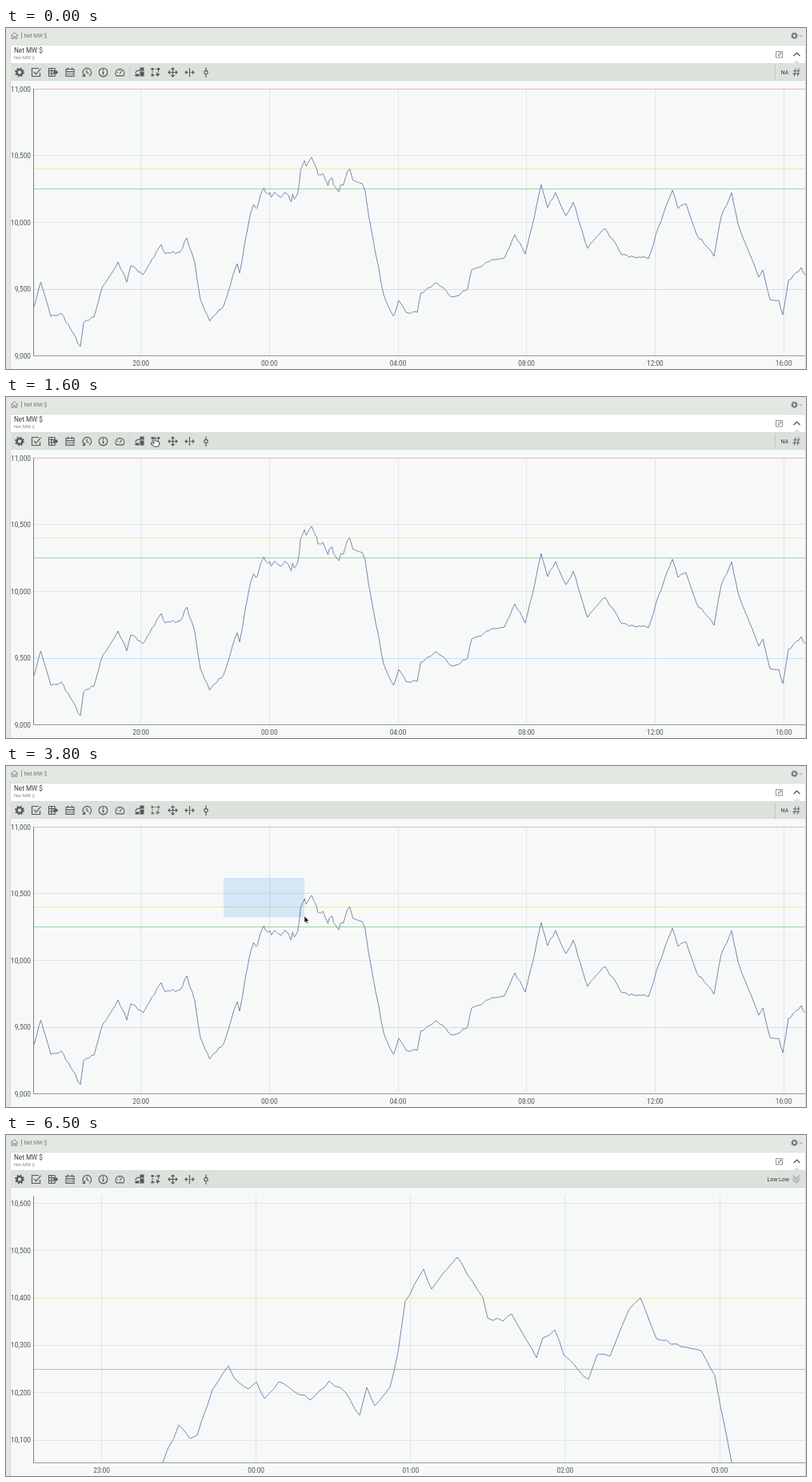
An HTML page that plays this animation: 1000x427 px, repeating every 6800 ms.

```html
<!DOCTYPE html>
<html lang="en">
<head>
<meta charset="utf-8">
<title>Net MW trend</title>
<style>
  html, body { margin: 0; width: 100%; height: 100%; overflow: hidden; background: #e3e8e2; }
  svg { display: block; width: 100vw; height: 100vh; }
  text { font-family: Roboto, Arial, sans-serif; fill: #4c5156; }
  .axis text { font-size: 8.3px; }
  .icon { fill: none; stroke: #535960; stroke-width: 1.15; }
  .icon .f { fill: #535960; stroke: none; }
  .trend { fill: none; stroke: #7787ad; stroke-width: 1; stroke-linejoin: round; }
  .grid { stroke: #e1e5e7; stroke-width: 1; }
  #box { fill: #dcedfd; mix-blend-mode: multiply; }
</style>
</head>
<body>
<svg viewBox="0 0 1000 427" preserveAspectRatio="none">
  <defs>
    <clipPath id="plot"><rect x="34" y="76" width="966" height="335"/></clipPath>
    <g id="gear">
      <circle r="3.4" fill="none" stroke="currentColor" stroke-width="2.4"/>
      <circle r="5" fill="none" stroke="currentColor" stroke-width="1.8" stroke-dasharray="1.96 1.96"/>
    </g>
  </defs>

  <rect width="1000" height="427" fill="#e3e8e2"/>
  <rect x="5.5" y="21.5" width="994" height="23" fill="#fff" stroke="#d9ded9"/>
  <rect x="6" y="45" width="994" height="21" fill="#dce1db"/>
  <rect x="6" y="66" width="994" height="361" fill="#f7f9f9"/>
  <path d="M5.5 66V427M6 65.5H1000M999.5 45V427" fill="none" stroke="#d3d8d3"/>
  <path d="M983 45l5.5-4.5 5.5 4.5z" fill="#dce1db"/>

  <!-- breadcrumb and title -->
  <g class="icon" style="stroke-width:.8">
    <path d="M6 9.8l4.500-4 4.500 4M7.300 9v4.300h2.200v-2.800h2v2.800h2.200V9" stroke="#6b7074"/>
    <path d="M19.500 5.500v8" stroke="#777c80"/>
    <path d="M992 9.200l1.500 1.600 1.500-1.600" stroke="#68717c"/>
  </g>
  <use href="#gear" color="#68758a" transform="translate(985.5 9.7) scale(.72)"/>
  <text x="22.5" y="12" font-size="6.5" style="fill:#73787c">Net MW $</text>
  <text x="10" y="31.3" font-size="8.2" style="fill:#3c4146">Net MW $</text>
  <text x="10" y="39.3" font-size="5.9" style="fill:#85898d">Net MW $</text>
  <g class="icon" style="stroke-width:.9">
    <path d="M962.5 29.500h8v7.500h-8zM965.500 34.500l3-3M966.700 31.200h2v2M965.300 32.800v2h2" stroke="#7b848e"/>
    <path d="M984.500 35l4-3.800 4 3.800" stroke-width="1.200"/>
  </g>

  <!-- toolbar -->
  <g class="icon">
    <use href="#gear" color="#535960" x="17" y="55.500"/>
    <path d="M41 50.500h-8.500v10h10v-4.500M34.800 54.800l2.700 3 6-7"/>
    <path d="M53.500 50.500h7.500v10h-7.500zM53.500 53.500h7.500M53.500 57h7.500M57 50.500v10"/>
    <path class="f" d="M59 54.500h2.800v-2.200l3.500 3.200-3.500 3.200v-2.200h-2.800z"/>
    <path d="M75 51.500h10v9H75zM75 54.500h10M77.500 49.500v3M82.500 49.500v3"/>
    <path d="M76.800 56.600h6.600M76.800 58.700h6.600" stroke-dasharray="1.400 1.200"/>
    <path d="M98 59.800a5.300 5.300 0 1 1 6 .5M95.500 60.300h3v-3M101 52.500v3.300l2.500 1.500"/>
    <circle cx="121.500" cy="55.500" r="5.300"/>
    <path d="M121.500 54.500v4" stroke-width="1.700"/><circle class="f" cx="121.500" cy="52.500" r="1"/>
    <path d="M138 59.800a5.400 5.400 0 1 1 8.800 0zM142 57.500l3-4M138.700 55.500h1.500M142.300 52v1.300"/>
    <path d="M154.500 47.500v17" stroke="#d0d5d0" stroke-width="1"/>
    <path class="f" d="M167.500 49.500h5v4h-5zM167.500 54.500h5v6h-5zM161.500 57.500h5v3h-5z"/>
    <path d="M161.500 56l3-3 2.500.5 2-2.500"/>
    <g id="zoomTool">
      <path d="M183 51.500h7.500v7.500H183z" stroke-dasharray="2 1.200"/>
      <path class="f" d="M181.500 50h2.800v2.800h-2.800zM189.200 50h2.800v2.800h-2.800zM181.500 57.700h2.800v2.800h-2.800zM187.500 55.500l5.500 3-2.500.6-1 2.400z"/>
    </g>
    <path d="M203 55.500h11M208.500 50v11M205 53.500l-2 2 2 2M212 53.500l2 2-2 2M206.500 52l2-2 2 2M206.500 59l2 2 2-2"/>
    <path d="M224 55.500h4M231 55.500h4M229.500 50v11M226 53.500l-2 2 2 2M233 53.500l2 2-2 2"/>
    <path d="M250 49.500v3.500M250 58v4"/><circle cx="250" cy="55.500" r="2.200"/>
  </g>

  <g id="stateFull">
    <path d="M961.500 46v19" stroke="#c3c8c4"/>
    <text x="968.500" y="58.200" font-size="7" style="fill:#33383d">NA</text>
    <path class="icon" d="M986.800 50.500l-1.500 10M991 50.500l-1.500 10M984 53.700h8.500M983.500 57.300h8.500" style="stroke:#68717c"/>
  </g>
  <g id="stateZoom">
    <text x="951.500" y="58" font-size="6.900" style="fill:#33383d">Low Low</text>
    <path class="icon" d="M983.500 50.500l4.300 3.700 4.300-3.700M983.500 53.500l4.300 3.700 4.300-3.700M983.500 56.300l4.300 3.700 4.300-3.700" style="stroke:#7d8ca3;stroke-width:1"/>
  </g>

  <g id="full" class="axis"></g>
  <g id="zoom" class="axis"></g>
  <path d="M34.500 76V411" stroke="#7d8184"/>
  <path d="M34 410.500H999" stroke="#979b9e"/>

  <rect id="box" x="272" y="140"/>
  <path id="arrow" d="M0 0V8.200L1.900 6.500 3.100 9.200 4.400 8.600 3.200 6H5.800Z" fill="#111" stroke="#fff" stroke-width=".5"/>
  <path id="hand" d="M-1 0Q0-1 1 0V4L5 5Q6 5.500 5.600 8L4.500 11H-1.500L-4.500 7Q-4.500 5.500-3 6L-1 7.500Z" fill="#fff" stroke="#33383d" stroke-width=".9"/>
</svg>
<script>
const $ = id => document.getElementById(id);
const LOOP = 6800, STEP = 100;

// Turning points of the trend (x, y); the night is in zoomed coordinates
const evening = [35,349, 43.5,318, 56,361, 69,357, 93,399, 97,369, 110,362, 121,323, 140,293,
  151,318, 156,298, 171,309, 194,271, 199,283, 218,280, 226,263, 236,294, 243,340, 254.5,367,
  272,348, 289,295, 292,307, 302,251];
const night = [196,410, 216,363, 230,380, 239,376, 258,319, 278,289, 285,304, 303,318, 313,309,
  323,330, 341,309, 380,332, 404,308, 425,323, 442,351, 451,316, 461,339, 480,316, 490,272,
  499,208, 522,168, 532,193, 564,153, 596,203, 602,229, 621,233, 632,224, 663,279, 671,254,
  686,244, 697,275, 728,306, 739,275, 755,277, 779,218, 793,204, 813,255, 869,270, 886,301, 907,410];
const day = [456,249, 472,334, 484.5,361, 491,341, 500,356, 514,356, 518.5,332, 538,319, 559,337,
  577,327, 582,303, 610,290, 623,288, 636,259, 649,283, 658,247, 669,196, 677,225, 687,206,
  700,235, 709,218, 727,276, 749,251, 770,284, 803,289, 816,248, 833,203, 840,226, 850,220,
  863,258, 885,286, 894,236, 907,206, 915,245, 941,312, 946,303, 955,340, 966,341, 971,359,
  978,316, 994,300, 999,309];

let seed = 7;
const random = () => (seed = seed * 16807 % 2147483647) / 2147483647;

// Joins turning points with a slightly uneven line
function rough(keys, step, amp) {
  const out = [[keys[0], keys[1]]];
  for (let i = 2; i < keys.length; i += 2) {
    const [x0, y0, x1, y1] = keys.slice(i - 2, i + 2);
    const n = Math.max(1, Math.round((x1 - x0) / step));
    for (let j = 1; j <= n; j++) {
      const wobble = j < n ? (random() * 2 - 1) * amp : 0;
      out.push([x0 + (x1 - x0) * j / n, y0 + (y1 - y0) * j / n + wobble]);
    }
  }
  return out;
}

const nightLine = rough(night, 6.5, 2.5);
const shrink = ([x, y]) => [329.5 + (x - 312.5) * .2082, 159.6 + (y - 144.8) * .2818];
const fullLine = [...rough(evening, 3, 1.8), ...nightLine.map(shrink), ...rough(day, 3, 1.8)];

const crisp = v => Math.floor(v) + .5;
const hour = h => String(h % 24).padStart(2, '0') + ':00';
const limits = [[11000, '#f2b3b5'], [10400, '#f1e6a8'], [10250, '#9ad2a2'], [9500, '#c3e0f5']];

function chart(id, o) {
  const y = v => o.y0 - (v - o.v0) * o.perUnit;
  const row = (v, attr) => `<path ${attr} d="M35 ${crisp(y(v))}H999"/>`;
  let s = '';
  for (let v = o.v0; v <= o.v1; v += o.dv) {
    if (v > 9000) s += row(v, 'class="grid"');
    s += `<text x="31" y="${y(v) + 3}" text-anchor="end">${v.toLocaleString('en-US')}</text>`;
  }
  for (let i = 0; i < o.cols; i++) {
    const x = o.x0 + i * o.dx;
    s += `<path class="grid" d="M${crisp(x)} 76V410"/>
      <text x="${x}" y="423" text-anchor="middle">${hour(o.h0 + i * o.dh)}</text>`;
  }
  for (const [v, c] of limits) if (v >= o.v0 && v <= o.v1) s += row(v, `stroke="${c}"`);
  s += `<polyline class="trend" clip-path="url(#plot)" points="${o.line.join(' ')}"/>`;
  $(id).innerHTML = s;
}

chart('full', { v0: 9000, v1: 11000, dv: 500, y0: 410.5, perUnit: .167,
  x0: 168.6, dx: 160.7, cols: 6, h0: 20, dh: 4, line: fullLine });
chart('zoom', { v0: 10100, v1: 10600, dv: 100, y0: 382.1, perUnit: .5932,
  x0: 119.6, dx: 193.1, cols: 5, h0: 23, dh: 1, line: nightLine });

// Pointer stops: time, x, y
const stops = [
  [300, 262, 410], [500, 214, 180], [700, 197, 95], [1000, 189, 62], [1600, 186, 51],
  [1700, 186, 51], [2300, 271, 138], [2400, 271, 138], [2500, 273, 140.5], [3100, 273, 140.5],
  [4500, 473, 235.5], [5200, 473, 235.5], [5700, 494, 339], [6100, 511, 430]
];
const smooth = k => k * k * (3 - 2 * k);

function pointer(t) {
  const i = stops.findIndex(p => p[0] > t);
  if (i < 1) return null;
  const [a, b] = [stops[i - 1], stops[i]];
  let k = (t - a[0]) / (b[0] - a[0]);
  if (t >= 1700 && t < 4500) k = smooth(k);
  return [a[1] + (b[1] - a[1]) * k, a[2] + (b[2] - a[2]) * k];
}

const show = (id, on) => { $(id).style.display = on ? '' : 'none'; };

function draw(time) {
  const t = Math.floor(time % LOOP / STEP) * STEP;
  const zoomed = t >= 4800, p = pointer(t), hover = t >= 1000 && t < 1800;
  show('full', !zoomed);
  show('stateFull', !zoomed);
  show('zoom', zoomed);
  show('stateZoom', zoomed);
  show('arrow', p && !hover);
  show('hand', p && hover);
  if (p) $(hover ? 'hand' : 'arrow').setAttribute('transform', `translate(${p})`);
  $('zoomTool').style.opacity = t >= 1800 && !zoomed ? .75 : 1;
  const drag = t > 3100 && !zoomed;
  show('box', drag);
  if (drag) {
    $('box').setAttribute('width', p[0] - 272);
    $('box').setAttribute('height', p[1] - 138.5);
  }
}

const start = performance.now();
function tick() {
  draw(performance.now() - start);
  requestAnimationFrame(tick);
}
tick();
</script>
</body>
</html>
```
